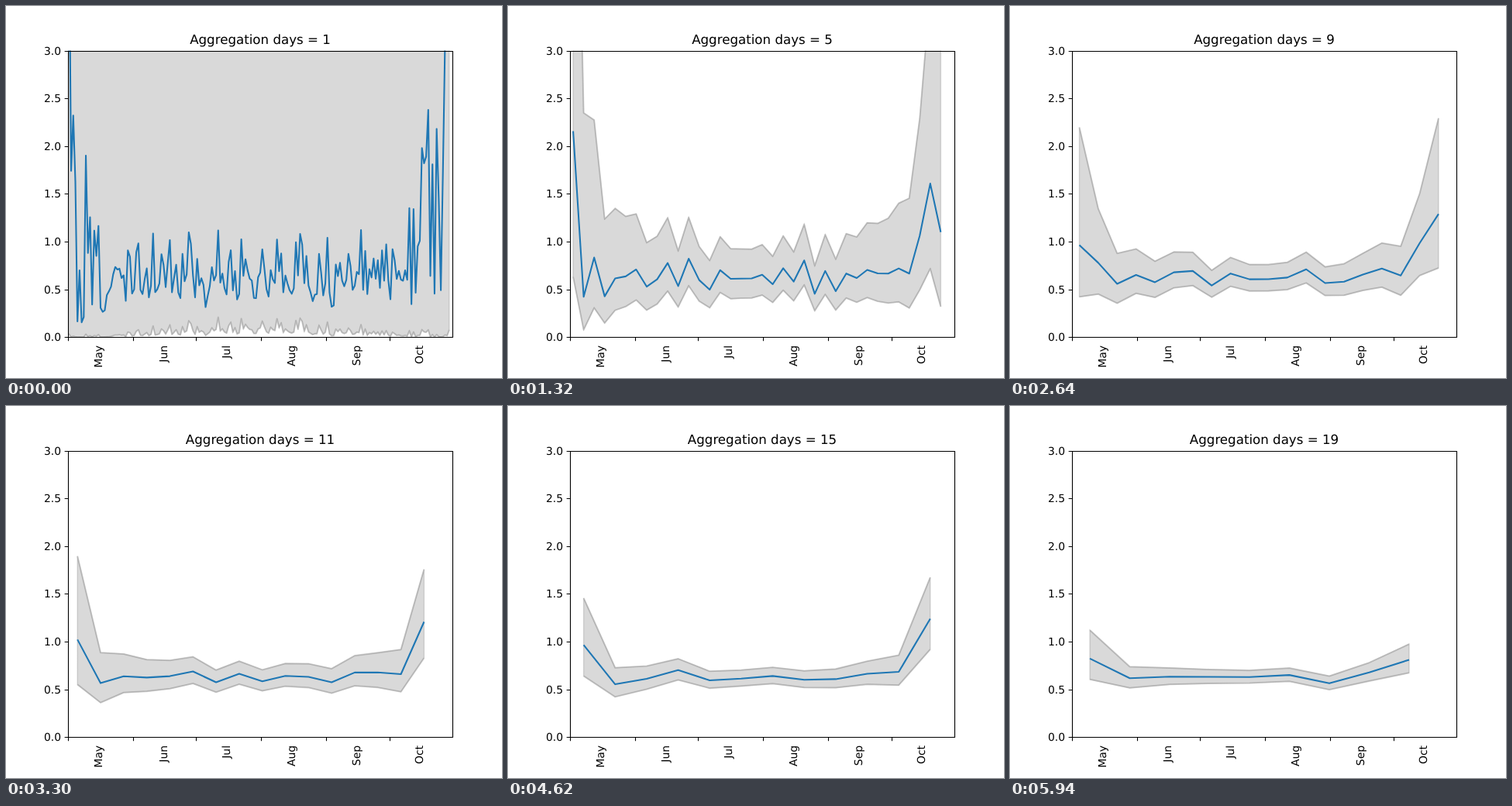
Recreate the animation shown at these times as an HTML page. Size 640 by 480 pixels, loop 6270 ms.

```html
<!DOCTYPE html>
<html lang="en">
<head>
<meta charset="utf-8">
<title>Aggregation days</title>
<style>
  html, body { margin: 0; width: 100%; height: 100%; overflow: hidden; background: #fff; }
  svg { display: block; font: 13.89px "DejaVu Sans", sans-serif; text-rendering: geometricPrecision; }
  .axis { fill: none; stroke: #000; stroke-width: 1.11; }
  .band { fill: rgba(128, 128, 128, .3); stroke: rgba(128, 128, 128, .3); stroke-width: 1.39; }
  .edge, .mid { fill: none; stroke-width: 2.08; stroke-linejoin: round; }
  .edge { stroke: rgba(128, 128, 128, .3); }
  .mid { stroke: #1f77b4; }
</style>
</head>
<body>
<svg width="640" height="480" viewBox="0 0 640 480">
  <clipPath id="plot"><rect x="80" y="57.6" width="496" height="369.6"/></clipPath>
  <g clip-path="url(#plot)">
    <path class="band" id="band"/>
    <path class="edge" id="low"/>
    <path class="edge" id="high"/>
    <path class="mid" id="mid"/>
  </g>
  <path class="axis" id="axis"/>
  <g id="labels"></g>
  <text id="title" x="328" y="49" font-size="16.67" text-anchor="middle"></text>
</svg>
<script>
const STEP = 330, MAX_DAYS = 19, DAYS = 183;

// The season opens and closes with wild days; in between only weekly levels are set
const opening = [1.5, 4.3, 1.74, 2.32, 1.63, .165, .7, .155, .21, 1.9, .88,
  1.255, .34, 1.115, .85, 1.165, .305, .265, .28, .44, .48];
const weekly = [.655, .665, .585, .62, .625, .71, .515, .625, .64, .58,
  .635, .675, .64, .57, .61, .535, .645, .7, .695, .64];
const closing = [.7, .6, 1.35, .345, 1.34, .465, .95, 1.01, 1.98, 1.82, 1.89,
  2.38, .64, 1.81, .455, 2.18, 1.45, .49, 1.75, 3.1, 3.1, 6];

const $ = id => document.getElementById(id);
const px = day => 80 + day * 496 / DAYS;
const py = value => Math.max(-9999, 427.2 - value * 123.2);
const snap = v => Math.floor(v + .5) + .5;
const range = (count, f) => Array.from({ length: count }, (_, i) => f(i));
const mean = list => list.reduce((a, b) => a + b, 0) / list.length;

let seed = 2024;
const random = () => (seed = seed * 16807 % 2147483647) / 2147483647;

// Seven noisy days whose log mean stays at the weekly level
function noisyWeek(level) {
  const noise = range(7, random);
  const centre = mean(noise);
  return noise.map(v => level * Math.exp(v - centre));
}

const daily = [...opening, ...weekly.flatMap(noisyWeek), ...closing];

// Log width of the band: narrow in midsummer, for high ratios and for long spans
function spread(days, day, ratio) {
  const u = (day - 91) / 90;
  return (2 + 2.4 * u ** 2 + 6 * u ** 10) / days * (ratio / .63) ** -.4;
}

function buildPaths(days) {
  const mid = [], low = [], high = [];
  for (let start = 0; start + days <= DAYS; start += days) {
    const day = start + days / 2 - 1;
    const ratio = mean(daily.slice(start, start + days).map(v => v ** .25)) ** 4;
    const width = Math.exp(spread(days, day, ratio));
    const point = value => px(day).toFixed(2) + "," + py(value).toFixed(2);
    mid.push(point(ratio));
    low.push(point(ratio / width));
    high.push(point(ratio * width));
  }
  const line = list => "M" + list.join("L");
  return {
    mid: line(mid), low: line(low), high: line(high),
    band: line([...low, ...high.reverse()]) + "Z"
  };
}

function drawAxes() {
  let axis = "M80.5 58.5H576.5V427.5H80.5Z", labels = "";
  for (let value = 0; value <= 3; value += .5) {
    const y = py(value);
    axis += `M80.5 ${snap(y)}h-4.86`;
    labels += `<text x="71" y="${Math.round(y + 5)}" text-anchor="end">${value.toFixed(1)}</text>`;
  }
  const months = { May: 0, Jun: 31, Jul: 61, Aug: 92, Sep: 123, Oct: 153 };
  for (const [name, start] of Object.entries(months)) {
    const x = Math.floor(px(start + 15) + 3.5);
    axis += `M${snap(px(start))} 427.5v4.86`;
    labels += `<text transform="translate(${x} 438) rotate(-90)" text-anchor="end">${name}</text>`;
  }
  $("axis").setAttribute("d", axis);
  $("labels").innerHTML = labels;
}

const charts = range(MAX_DAYS, i => buildPaths(i + 1));
let shown = -1;

function frame() {
  const index = Math.floor(performance.now() / STEP) % MAX_DAYS;
  if (index !== shown) {
    shown = index;
    for (const [id, d] of Object.entries(charts[index])) $(id).setAttribute("d", d);
    $("title").textContent = `Aggregation days = ${index + 1}`;
  }
  requestAnimationFrame(frame);
}

drawAxes();
frame();
</script>
</body>
</html>
```
